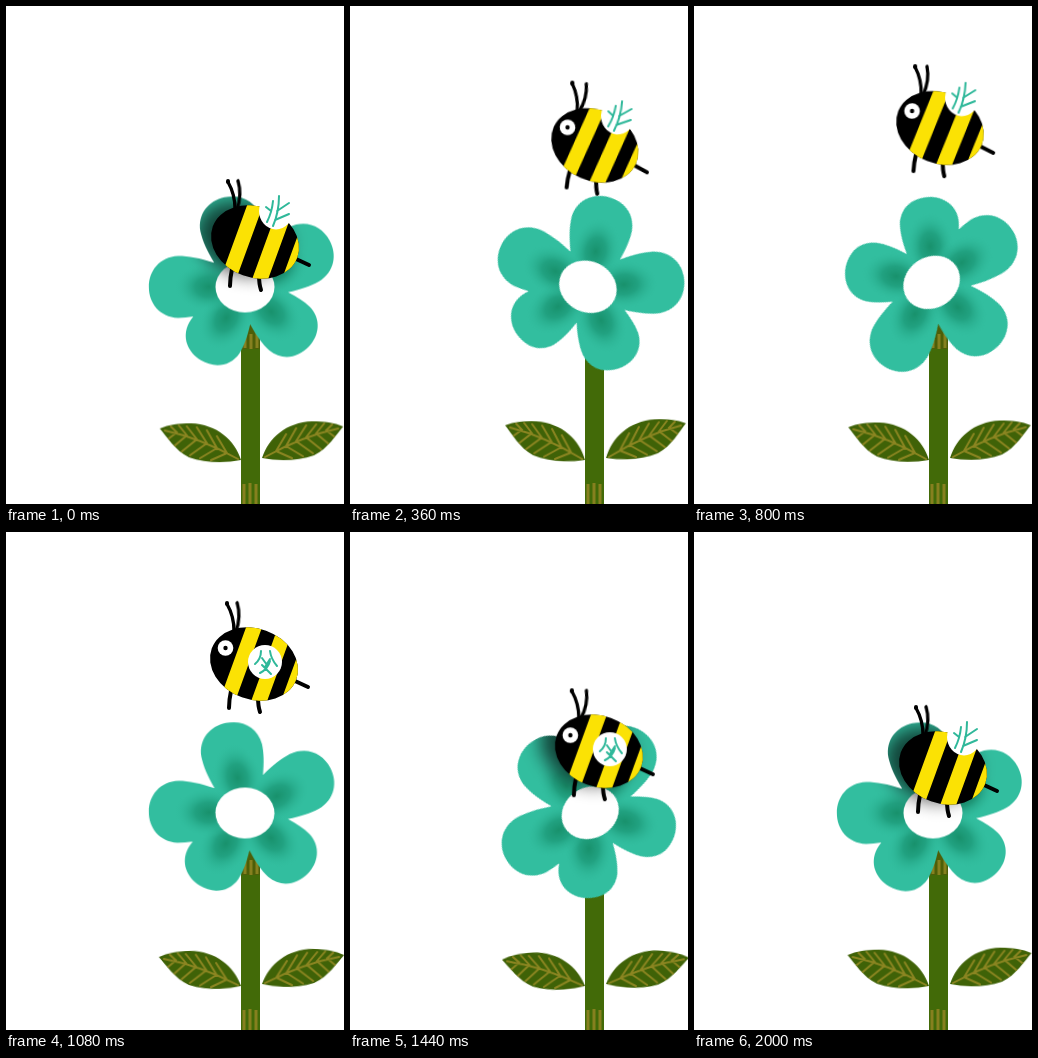
Recreate the animation shown at these times as an HTML page without scripts. Size 338 by 498 pixels, loop 2.04 s.

```html
<!DOCTYPE html>
<html lang="en">
<head>
<meta charset="utf-8">
<title>Bee and flower</title>
<style>
  html, body { margin: 0; width: 100%; height: 100%; overflow: hidden; background: #fff; }
  svg { display: block; width: 100vw; height: 100vh; }

  .bee { animation: fly 2.04s ease-in-out infinite; }
  .spin { --d: 1; animation: spin 2.04s linear infinite; }
  .unspin { --d: -1; animation: spin 2.04s linear infinite; }
  .sway { animation: sway 1.02s ease-in-out -1.59s infinite alternate; }
  .eye { animation: blink 2.04s step-end infinite; }
  .feeler { animation: twitch .51s ease-in-out infinite alternate; }
  .wings { animation: flap 2.04s step-end infinite; }
  .up { opacity: var(--up); }
  .down { opacity: calc(1 - var(--up)); }

  @keyframes fly {
    0%, 100% { transform: translate(249px, 236px) rotate(0deg); }
    24.5% { transform: translate(244px, 121px) rotate(5deg); }
    39.2% { transform: translate(246px, 122px) rotate(2deg); }
    52.9% { transform: translate(248px, 132px) rotate(0deg); }
    77.5% { transform: translate(249px, 236px) rotate(0deg); }
  }
  @keyframes spin {
    0% { transform: rotate(0deg); }
    11.76% { transform: rotate(calc(var(--d) * 6deg)); }
    17.65% { transform: rotate(calc(var(--d) * 25deg)); }
    21.57% { transform: rotate(calc(var(--d) * 62deg)); }
    25.49% { transform: rotate(calc(var(--d) * 117deg)); }
    29.41% { transform: rotate(calc(var(--d) * 210deg)); }
    33.33% { transform: rotate(calc(var(--d) * 330deg)); }
    39.22% { transform: rotate(calc(var(--d) * 506deg)); }
    46.08% { transform: rotate(calc(var(--d) * 620deg)); }
    52.94% { transform: rotate(calc(var(--d) * 720deg)); }
    61.76% { transform: rotate(calc(var(--d) * 900deg)); }
    66.67% { transform: rotate(calc(var(--d) * 1000deg)); }
    70.59% { transform: rotate(calc(var(--d) * 1051deg)); }
    76.47% { transform: rotate(calc(var(--d) * 1076deg)); }
    82.35%, 100% { transform: rotate(calc(var(--d) * 1080deg)); }
  }
  @keyframes sway {
    from { transform: rotate(2deg); }
    to { transform: rotate(-4deg); }
  }
  @keyframes blink {
    0%, 90.1% { opacity: 0; }
    5.88% { opacity: 1; }
  }
  @keyframes twitch {
    from { transform: rotate(-4deg); }
    to { transform: rotate(6deg); }
  }
  @keyframes flap {
    0%, 7.84%, 17.64%, 27.45%, 37.25%, 47.05%, 56.86%, 66.66%, 76.47%, 86.27%, 96.07% { --up: 1; }
    1.96%, 11.76%, 21.56%, 31.37%, 41.17%, 50.98%, 60.78%, 70.58%, 80.39%, 90.19% { --up: 0; }
  }
</style>
</head>
<body>
<svg viewBox="0 0 338 498" preserveAspectRatio="none">
  <defs>
    <radialGradient id="deep">
      <stop offset="0" stop-color="#158c66" stop-opacity=".9"/>
      <stop offset=".4" stop-color="#189270" stop-opacity=".65"/>
      <stop offset="1" stop-color="#32be9f" stop-opacity="0"/>
    </radialGradient>
    <filter id="soft" x="-40%" y="-40%" width="180%" height="180%">
      <feGaussianBlur stdDeviation="9"/>
    </filter>
    <path id="petal" d="M-18-12C-27-36-31-50-31-64C-30-82-16-92 0-92C16-92 30-82 31-64C31-50 27-36 18-12L0 0Z"/>
    <ellipse id="shade" cy="-36" rx="25" ry="35" fill="url(#deep)"/>
    <clipPath id="bloom" transform="translate(0 2.5)">
      <use href="#petal" transform="rotate(-13)"/>
      <use href="#petal" transform="rotate(61) scale(1 1.05)"/>
      <use href="#petal" transform="rotate(133) scale(.96 .95)"/>
      <use href="#petal" transform="rotate(211) scale(.95 .93)"/>
      <use href="#petal" transform="rotate(270) scale(1 1.045)"/>
      <circle r="28"/>
    </clipPath>
    <clipPath id="body"><ellipse rx="45" ry="35.5"/></clipPath>
    <g id="leaf">
      <path fill="#3f6207" d="M0 0C-6-20-24-36-50-37C-62-37-72-36-81-32C-74-24-66-10-52-3C-36 3-16 3 0 0Z"/>
      <path fill="none" stroke="#8b8521" stroke-width="2" stroke-linecap="round"
        d="M-76-30Q-40-22-3-1M-24-24L-14-7L-30 0M-34-30L-24-12L-41-2M-44-33L-34-17L-51-5M-54-34L-44-21L-59-9M-62-35L-54-25L-66-15M-70-34L-64-28L-72-22"/>
    </g>
  </defs>

  <!-- stem and leaves -->
  <path fill="#426a08" d="M235 300H254V498H235Z"/>
  <path fill="#4d5e08" d="M235 300H254V343H235Z"/>
  <path fill="none" stroke="#86801f" stroke-width="3" d="M239 326V342M245 328V343M251 326V342M238 478V498M244 477V498M250 478V498"/>
  <g transform="translate(235 454)"><use class="sway" href="#leaf"/></g>
  <g transform="translate(256 452) scale(-1 1)"><use class="sway" href="#leaf"/></g>

  <!-- flower with the shadow falling on it -->
  <g transform="translate(239 278.5)">
    <g class="spin">
      <g clip-path="url(#bloom)">
        <circle r="106" fill="#32be9f"/>
        <g transform="translate(0 2.5)">
          <use href="#shade" transform="rotate(-13)"/>
          <use href="#shade" transform="rotate(61)"/>
          <use href="#shade" transform="rotate(133)"/>
          <use href="#shade" transform="rotate(211)"/>
          <use href="#shade" transform="rotate(270)"/>
          <ellipse rx="29.5" ry="25.5" fill="#fff"/>
        </g>
        <g class="unspin">
          <g transform="translate(-239 -278.5)">
            <g class="bee">
              <ellipse cx="-13" cy="1" rx="47" ry="36" transform="rotate(20)" opacity=".65" filter="url(#soft)"/>
            </g>
          </g>
        </g>
      </g>
    </g>
  </g>

  <!-- bee -->
  <g class="bee">
    <g fill="none" stroke="#000" stroke-width="3.3" stroke-linecap="round">
      <path d="M-20-33C-20-44-23-53-27-60"/>
      <g transform="translate(-18 -33)">
        <path class="feeler" d="M0 0C4-9 5-19 3-28M3-27v-1"/>
      </g>
      <path stroke-width="4" d="M-27-60v-1M-23 27Q-25 36-25 44M4 33Q4 42 6 48M41 17L54 23"/>
    </g>
    <g transform="rotate(20)">
      <g clip-path="url(#body)">
        <rect x="-46" y="-36" width="92" height="72"/>
        <path fill="#fbe204" d="M-20-36h15v72h-15zM10-36h15v72h-15zM38-36h9v72h-9z"/>
      </g>
    </g>
    <g class="eye">
      <circle cx="-28.5" cy="-16" r="7.8" fill="#fff"/>
      <circle cx="-28.5" cy="-16" r="2.2"/>
    </g>
    <g class="wings" fill="none" stroke="#2fb89a" stroke-width="2" stroke-linecap="round">
      <g class="up">
        <ellipse cx="21" cy="-31" rx="17" ry="18.5" fill="#fff" stroke="none"/>
        <path d="M12-20Q17-30 18-41M16-31L11-35M18-16Q24-30 24-46M22-31L34-39M20-22L34-28"/>
      </g>
      <g class="down" transform="translate(11 -2)">
        <circle r="17" fill="#fff" stroke="none"/>
        <path d="M-10 2Q-4-3-4-11M-3-4L2 3M5-11Q6-3 12 4M5-3L0 5M-5 11Q3 7 5-1M-3 3L6 12"/>
      </g>
    </g>
  </g>
</svg>
</body>
</html>
```
